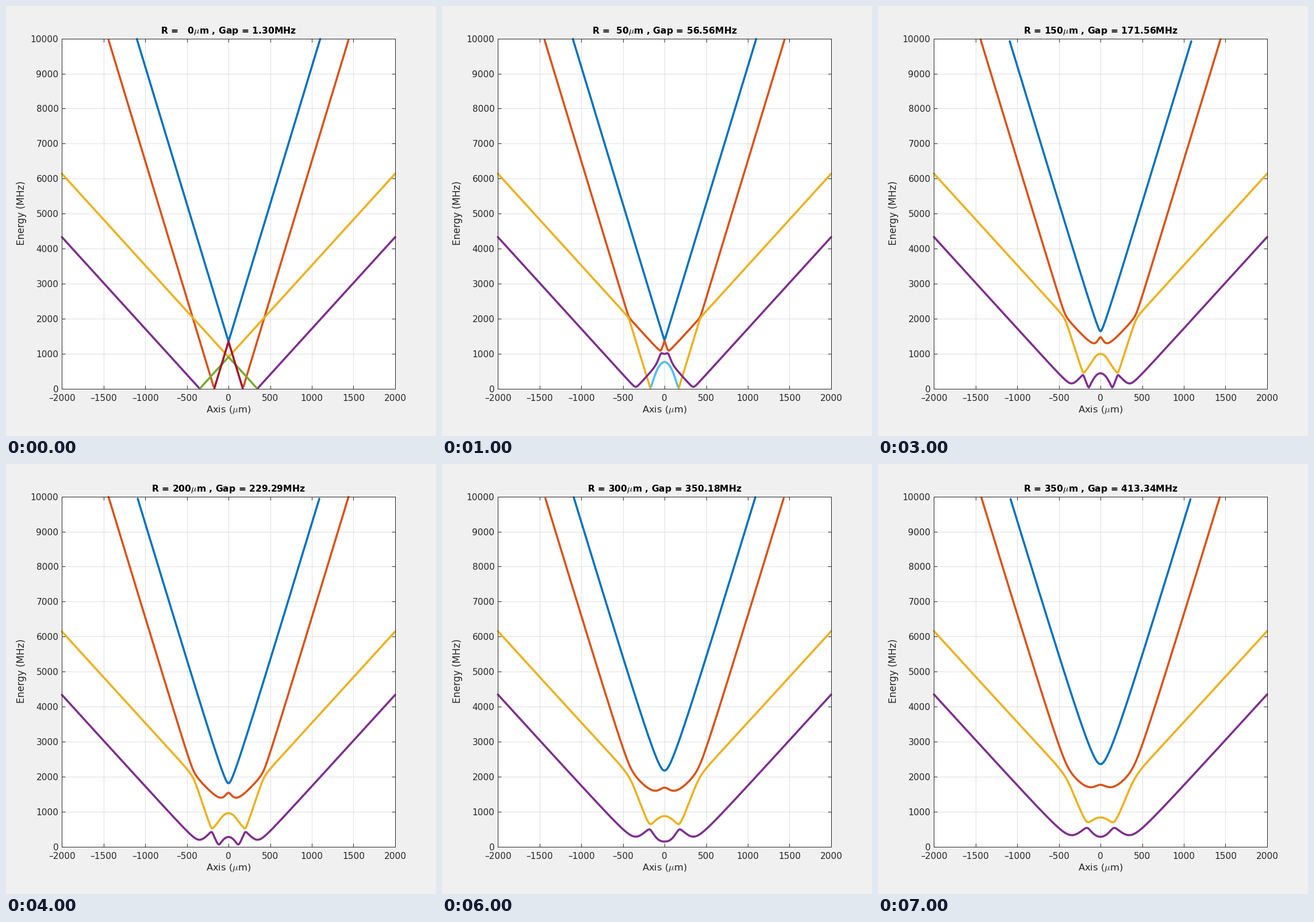
Recreate the animation shown at these times as a matplotlib script. Size 748x748 px, loop 8 s.

```python
import numpy as np
import matplotlib.pyplot as plt
from matplotlib.animation import FuncAnimation

SIZE, DPI = 748, 100
PX = 72 / DPI                      # points per pixel
LEFT, RIGHT, TOP, BOTTOM = 97.24, 676.94, 56.6, 665.7
INK = "#262626"
COLORS = ["#0072BD", "#D95319", "#EDB120", "#7E2F8E",
          "#77AC30", "#4DBEEE", "#A2142F", "#0072BD"]

DOUBLET = 833.5                    # half the zero-field splitting, MHz
STARK = 352.76                     # electric coupling at m = 1/2, MHz
ZEEMAN = 5.2346                    # magnetic gradient along the axis, MHz/um

RADII = np.arange(0, 400, 50)
FINE = np.arange(2000, -1, -2.5)   # states are followed on this grid
STRIDE = 4                         # and plotted on every fourth point
AXIS = FINE[::STRIDE]

plt.rcParams["font.family"] = "DejaVu Sans"
plt.rcParams["mathtext.fontset"] = "cm"


def spin_three_halves():
    m = np.array([1.5, 0.5, -0.5, -1.5])
    up = np.diag(np.sqrt(3.75 - m[1:] * (m[1:] + 1)), 1)
    return np.diag(m), (up + up.T) / 2


def levels(radius):
    """Eight energies along the half axis, followed inwards by state overlap."""
    jz, jx = spin_three_halves()
    one = np.eye(2)
    fixed = (np.kron(np.diag([DOUBLET, -DOUBLET]), np.eye(4))
             + 2 * STARK * np.kron(one[::-1], jz)
             + ZEEMAN * radius / 2 * np.kron(one, jx))
    h = fixed + ZEEMAN * FINE[:, None, None] * np.kron(one, jz)
    energy, vec = np.linalg.eigh(h)
    energy, vec = energy[:, ::-1], vec[:, :, ::-1]
    gap = np.min((energy[:, 1] - energy[:, 2])[::STRIDE])

    order = np.arange(8)
    tracked = np.empty_like(energy)
    tracked[0] = energy[0]
    overlap = np.abs(np.swapaxes(vec[:-1], 1, 2) @ vec[1:]).argmax(axis=2)
    for i, step in enumerate(overlap, 1):
        order = step[order]
        tracked[i] = energy[i, order]
    return tracked[::STRIDE], gap


def label(x, y, text, size, **kw):
    style = {"color": INK, "ha": "center", "va": "baseline",
             "rotation_mode": "anchor", **kw}
    return fig.text(x / SIZE, 1 - y / SIZE, text, fontsize=size * PX, **style)


def number(v):
    return f"{v}".replace("-", "\u2013")


fig = plt.figure(figsize=(SIZE / DPI, SIZE / DPI), dpi=DPI, facecolor="#F0F0F0")
ax = fig.add_axes([LEFT / SIZE, 1 - BOTTOM / SIZE,
                   (RIGHT - LEFT) / SIZE, (BOTTOM - TOP) / SIZE])
ax.set(xlim=(-2000, 2000), ylim=(0, 10000),
       xticks=range(-2000, 2001, 500), yticks=range(0, 10001, 1000))
ax.grid(color="#DFDFDF", linewidth=PX)
ax.set_axisbelow(True)
ax.tick_params(direction="in", top=True, right=True, length=6 * PX, width=PX,
               color=INK, labelleft=False, labelbottom=False)
for spine in ax.spines.values():
    spine.set(color=INK, linewidth=PX)

for v in range(-2000, 2001, 500):
    label(387.3 + v * (RIGHT - LEFT) / 4000, 687, number(v), 15.4)
for v in range(0, 10001, 1000):
    label(91.5, BOTTOM - v * (BOTTOM - TOP) / 10000 + 6, number(v), 15.4, ha="right")
label(387, 707.5, r"Axis ($\mu$m)", 16.4)
label(32.5, 360.5, "Energy (MHz)", 16.6, rotation=90)
title = label(387, 48, "", 15.65, weight="bold", color="black")

curves = [ax.plot([], [], color=c, linewidth=3.6 * PX, clip_on=False, zorder=2.1 + 0.01 * i,
                  solid_capstyle="round", solid_joinstyle="round")[0]
          for i, c in enumerate(COLORS)]
scenes = [levels(r) for r in RADII]
full_axis = np.concatenate([AXIS, -AXIS[-2::-1]])


def draw(frame):
    energy, gap = scenes[frame]
    title.set_text(rf"R = {RADII[frame]:3d}$\mu$m , Gap = {gap:.2f}MHz")
    for curve, e in zip(curves, energy.T):
        e = np.where((e >= 0) & (e <= 10000), e, np.nan)
        curve.set_data(full_axis, np.concatenate([e, e[-2::-1]]))
    return [title, *curves]


anim = FuncAnimation(fig, draw, frames=len(RADII), interval=1000, repeat=True)
plt.show()
```
